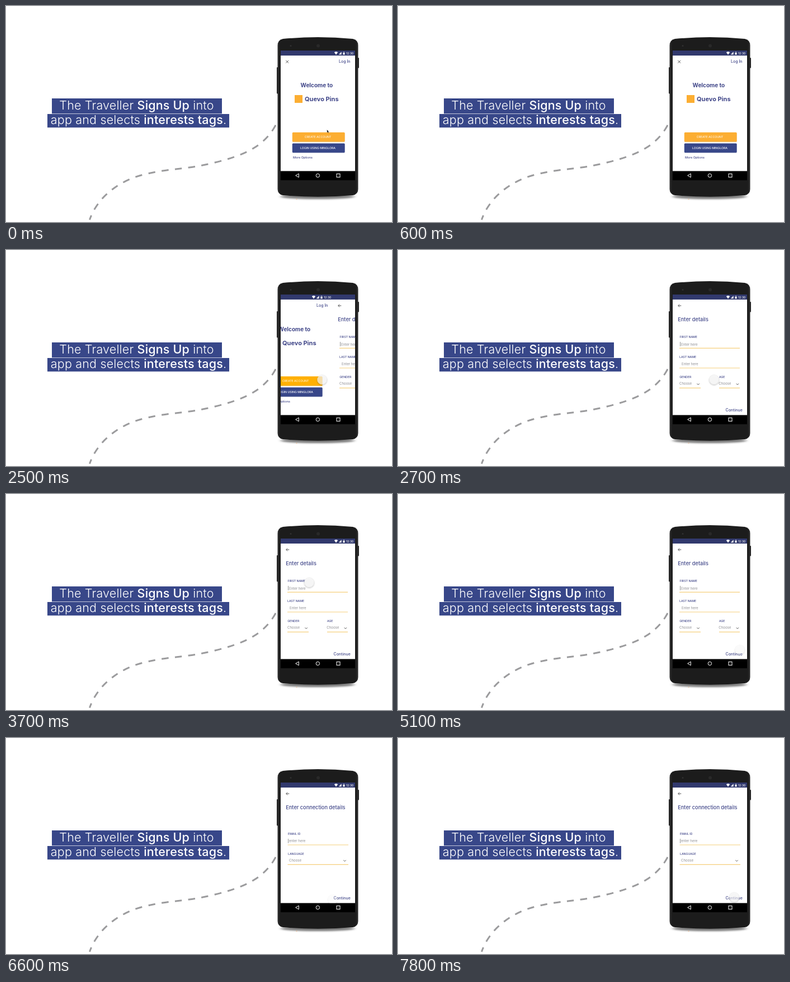
These frames come from a looping animation (690x388 px, 8000 ms). An HTML page:

```html
<!DOCTYPE html>
<html lang="en">
<head>
<meta charset="utf-8">
<title>Sign up</title>
<style>
html, body { margin: 0; width: 100%; height: 100%; overflow: hidden; background: #fff; }
svg { display: block; width: 100%; height: 100%; }
text { font-family: Inter, "Open Sans", sans-serif; fill: #414789; }
.navy { fill: #384789; }
.amber { fill: #fcae32; animation: press 8s step-end infinite; }
.headline text { font-size: 21.5px; font-weight: 300; letter-spacing: .18px; fill: #fff; text-anchor: middle; }
.headline tspan { font-weight: 550; }
.time { font-size: 5px; font-weight: 500; fill: #fff; }
.title { font-size: 9.2px; font-weight: 550; }
.welcome { font-size: 10px; font-weight: 700; }
.brand { font-size: 11px; font-weight: 700; }
.action { font-size: 7px; font-weight: 550; }
.label { font-size: 5.2px; font-weight: 550; }
.hint { font-size: 6.1px; fill: #8d8d92; }
.button { font-size: 5.2px; font-weight: 500; fill: #fff; text-anchor: middle; }
.small { font-size: 5.4px; font-weight: 500; }
.icon { fill: none; stroke: #444; stroke-width: .9; }
.rule { stroke: #f6cf7c; stroke-width: 1.2; }
.caret { stroke: #555; stroke-width: .6; }
.nav { fill: none; stroke: #fff; stroke-width: 1; }

.strip { animation: slide 8s step-end infinite; }
.touch { animation: touch 8s infinite; }
.pointer { animation: pointer 8s step-end infinite; }

/* one step is 100 ms, or 1.25% of the loop */
@keyframes slide {
  0% { transform: translateX(0); }
  31.25% { transform: translateX(-40px); }
  32.5% { transform: translateX(-106px); }
  33.75% { transform: translateX(-133px); }
  75% { transform: translateX(-173px); }
  76.25% { transform: translateX(-239px); }
  77.5%, 100% { transform: translateX(-266px); }
}
@keyframes press {
  0% { fill: #fcae32; }
  31.25%, 100% { fill: #ffb004; }
}
@keyframes touch {
  0% { transform: translate(600px, 71px); opacity: 0; animation-timing-function: step-end; }
  10% { transform: translate(600px, 71px); opacity: 0; animation-timing-function: step-end; }
  11.25% { transform: translate(600px, 80px); opacity: 1; animation-timing-function: step-end; }
  12.5% { transform: translate(603px, 94px); animation-timing-function: steps(3); }
  16.25% { transform: translate(602px, 181px); animation-timing-function: steps(5); }
  22.5% { transform: translate(565px, 241px); animation-timing-function: step-end; }
  23.75% { transform: translate(565px, 233px); animation-timing-function: step-end; }
  37.5% { transform: translate(565px, 233px); animation-timing-function: steps(4); }
  42.5% { transform: translate(541px, 130px); animation-timing-function: steps(3); }
  46.25% { transform: translate(542px, 159px); animation-timing-function: steps(3); }
  50% { transform: translate(543px, 182px); animation-timing-function: step-end; }
  53.75% { transform: translate(543px, 182px); opacity: 1; animation-timing-function: steps(8); }
  63.75% { transform: translate(611px, 280px); opacity: .5; animation-timing-function: steps(4); }
  68.75% { transform: translate(601px, 287px); opacity: .8; animation-timing-function: step-end; }
  78.75% { transform: translate(601px, 287px); opacity: .8; animation-timing-function: steps(3); }
  82.5% { transform: translate(584px, 290px); opacity: .3; animation-timing-function: steps(6); }
  90% { transform: translate(556px, 224px); opacity: .8; animation-timing-function: steps(2); }
  92.5% { transform: translate(592px, 270px); animation-timing-function: steps(2); }
  95% { transform: translate(592px, 277px); animation-timing-function: steps(2); }
  97.5%, 100% { transform: translate(601px, 286px); opacity: .9; }
}
@keyframes pointer {
  0% { opacity: 1; }
  3.75%, 100% { opacity: 0; }
}
</style>
</head>
<body>
<svg viewBox="0 0 690 388">
  <defs>
    <clipPath id="glass"><rect x="491" y="80" width="133" height="216.5"/></clipPath>
    <filter id="soft" x="-20%" y="-200%" width="140%" height="500%"><feGaussianBlur stdDeviation="3 1.5"/></filter>
    <filter id="lift" x="-50%" y="-50%" width="200%" height="200%">
      <feDropShadow dx="0" dy="1" stdDeviation=".8" flood-color="#000" flood-opacity=".38"/>
    </filter>
    <linearGradient id="shell" x2="1" y2="0">
      <stop offset="0" stop-color="#303030"/>
      <stop offset=".03" stop-color="#1c1c1c"/>
      <stop offset=".97" stop-color="#1c1c1c"/>
      <stop offset="1" stop-color="#303030"/>
    </linearGradient>
    <g id="status">
      <rect x="491" y="80" width="133" height="216.5" fill="#fff"/>
      <rect x="491" y="80" width="133" height="9" fill="#31396d"/>
      <g fill="#fff">
        <path d="M586.8 83.2Q590 81 593.2 83.2L590 87.4Z"/>
        <path d="M594.8 87.3H599.6V82.3Z"/>
        <rect x="602.4" y="84.2" width="3.2" height="3.2"/>
        <path d="M603 84.2V82.6H605V84.2" fill="none" stroke="#fff" stroke-width=".6"/>
      </g>
      <text class="time" x="608.3" y="86.9">12:30</text>
    </g>
    <path id="back" class="icon" d="M506.3 100H500.8M503.2 97.5L500.7 100L503.2 102.5"/>
    <path id="chevron" class="icon" d="M-2.2 -1.1L0 1.1L2.2 -1.1"/>
    <text id="next" class="action" x="585.5" y="289.6">Continue</text>
  </defs>

  <rect width="690" height="388" fill="#fff"/>
  <path d="M482 214C462 252 426 268 374 281S296 291 249 302S163 344 149.5 384"
        fill="none" stroke="#9b9b9d" stroke-width="3" stroke-dasharray="12.5 11.5"/>

  <g class="headline">
    <rect class="navy" x="82" y="166" width="304" height="27.3"/>
    <rect class="navy" x="74" y="194" width="325" height="24.3"/>
    <text x="233.5" y="186.4">The Traveller <tspan>Signs Up</tspan> into</text>
    <text x="237" y="212.3">app and selects <tspan>interests tags</tspan>.</text>
  </g>

  <ellipse cx="557" cy="342.5" rx="66" ry="4.5" fill="#000" opacity=".5" filter="url(#soft)"/>
  <circle cx="519.5" cy="347" r="1" fill="#f0b07a" opacity=".6"/>
  <rect x="484" y="110" width="4" height="47.5" rx="1" fill="#222"/>
  <rect x="627" y="93" width="4" height="18.5" rx="1" fill="#222"/>
  <path d="M485.5 71Q485.5 61 495 59Q557.5 53 620 59Q629.5 61 629.5 71V329Q629.5 338 620 340Q557.5 345.5 495 340Q485.5 338 485.5 329Z"
        fill="url(#shell)"/>
  <circle cx="558" cy="71.5" r="3" fill="#292929"/>
  <circle cx="509" cy="71.5" r="1.6" fill="#303030"/>
  <rect x="491" y="296" width="133" height="17" fill="#000"/>
  <g class="nav">
    <path d="M523.3 301.2V307.8L517.6 304.5Z"/>
    <circle cx="557.4" cy="304.5" r="3.2"/>
    <rect x="591" y="301.5" width="6" height="6"/>
  </g>

  <g clip-path="url(#glass)">
    <g class="strip">
      <g>
        <use href="#status"/>
        <path class="icon" d="M500.3 97.7L505.1 102.5M505.1 97.7L500.3 102.5"/>
        <text class="action" x="595" y="102.3">Log In</text>
        <text class="welcome" x="526.5" y="146.3">Welcome to</text>
        <rect class="amber" x="516" y="160" width="14" height="14"/>
        <text class="brand" x="534" y="171">Quevo Pins</text>
        <rect x="512" y="228" width="93.5" height="16.4" rx="1.5" fill="#e3c48b"/>
        <rect class="amber" x="511.8" y="227" width="93.8" height="16.7" rx="1.5"/>
        <text class="button" x="557.5" y="236.9" opacity=".85">CREATE ACCOUNT</text>
        <rect x="512" y="248" width="93.5" height="16" rx="1.5" fill="#a9aec9"/>
        <rect class="navy" x="511.8" y="246.7" width="93.8" height="16.6" rx="1.5"/>
        <text class="button" x="557.5" y="256.6">LOGIN USING MINGLORA</text>
        <text class="small" x="513" y="274">More Options</text>
      </g>

      <g transform="translate(133)">
        <use href="#status"/>
        <use href="#back"/>
        <text class="title" x="500.3" y="127.8">Enter details</text>
        <text class="label" x="503.6" y="158.4">FIRST NAME</text>
        <path class="caret" d="M504.5 165V173"/>
        <text class="hint" x="506" y="171.5">Enter here</text>
        <text class="label" x="503" y="194">LAST NAME</text>
        <text class="hint" x="507" y="207.2">Enter here</text>
        <text class="label" x="503.2" y="230">GENDER</text>
        <text class="label" x="574" y="230">AGE</text>
        <text class="hint" x="503" y="242.3">Choose</text>
        <text class="hint" x="573.2" y="242.3">Choose</text>
        <use href="#chevron" x="536.6" y="241"/>
        <use href="#chevron" x="606.8" y="241"/>
        <path class="rule" d="M503 176.3H611M503 212H611M503 247.8H541M574 247.8H611"/>
        <use href="#next"/>
      </g>

      <g transform="translate(266)">
        <use href="#status"/>
        <use href="#back"/>
        <text class="title" x="500.3" y="127.8">Enter connection details</text>
        <text class="label" x="504" y="174.2">EMAIL ID</text>
        <path class="caret" d="M504.5 181V189"/>
        <text class="hint" x="505.7" y="187.2">enter here</text>
        <text class="label" x="504" y="209.7">LANGUAGE</text>
        <text class="hint" x="506" y="222.2">Choose</text>
        <use href="#chevron" x="605.5" y="220.5"/>
        <path class="rule" d="M503.5 192H612M503.5 227.4H612"/>
        <use href="#next"/>
      </g>
    </g>

    <path class="pointer" d="M573.8 222.3V227.2L574.9 226.3L576 228L576.8 227.4L575.9 225.8H577.2Z" fill="#222"/>
    <g class="touch">
      <circle r="8.5" fill="#fff" fill-opacity=".62" stroke="#ddd" stroke-width=".4" filter="url(#lift)"/>
    </g>
  </g>
</svg>
</body>
</html>
```
